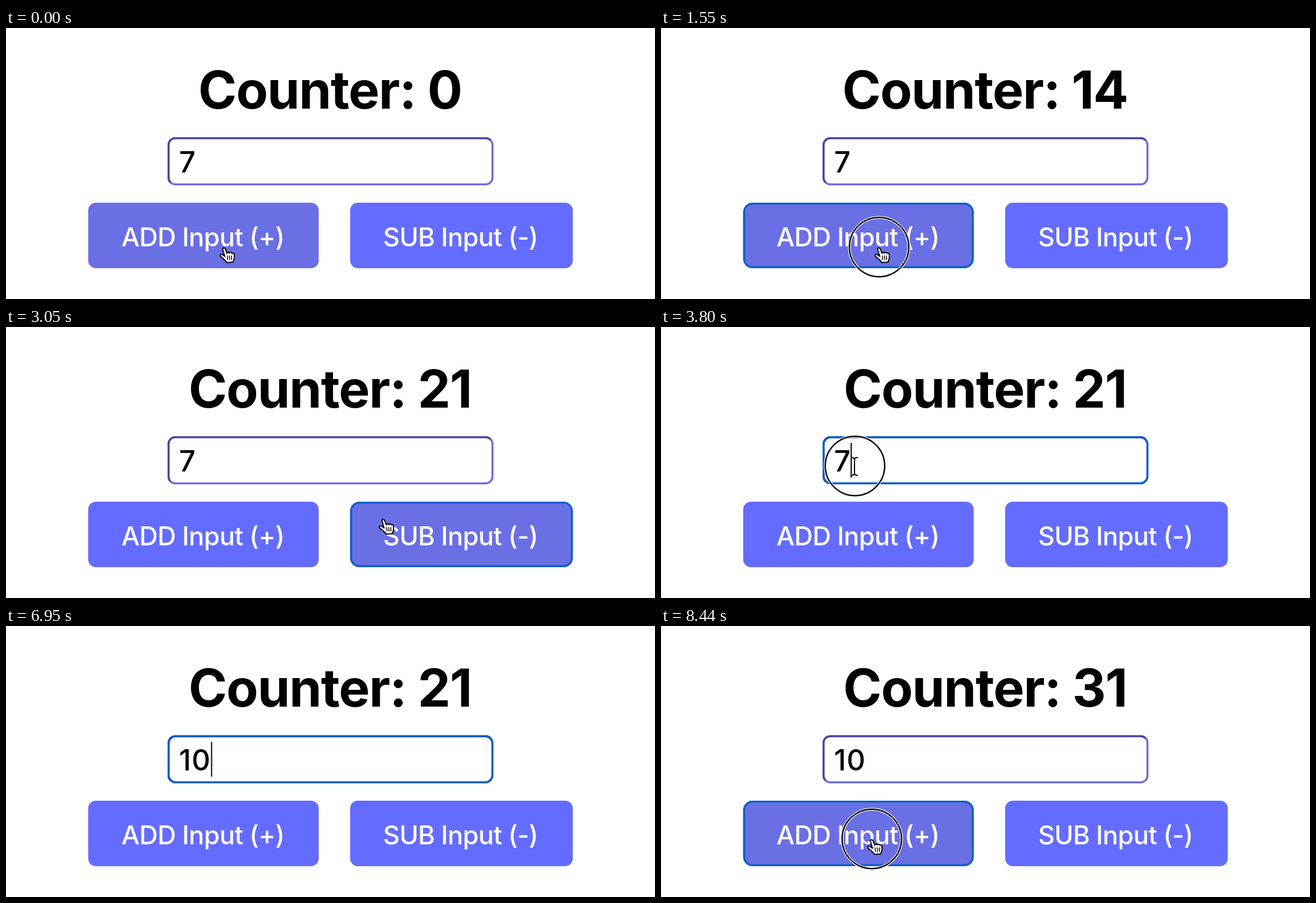
These frames come from a looping animation (1157x484 px, 8530 ms). An HTML page:

```html
<!DOCTYPE html>
<html lang="en">
<head>
<meta charset="utf-8">
<title>Counter</title>
<style>
  html, body { margin: 0; width: 100%; height: 100%; overflow: hidden; background: #fff; }
  svg { display: block; }
  text { font-family: Inter, "Liberation Sans", sans-serif; font-optical-sizing: none; font-feature-settings: "calt" 0; }
  #title { font-size: 93px; font-weight: 700; letter-spacing: -0.015em; text-anchor: middle; }
  .label { font-size: 46px; font-weight: 500; letter-spacing: -0.016em; text-anchor: middle; fill: #fff; }
  #value { font-size: 51.5px; font-weight: 500; letter-spacing: 0.02em; }
  .border { fill: none; stroke-width: 3.5; }
  .focus { stroke: #0a60c8; }
  .lit { stroke: #6c6ce0; }
  .dark { stroke: #48489f; }
</style>
</head>
<body>
<svg width="1157" height="484" viewBox="0 0 1157 484">
  <defs>
    <clipPath id="topLeft"><path d="M288 281V195H869L855 209L302 267Z"/></clipPath>
  </defs>
  <text id="title" x="577.7" y="144"></text>

  <rect class="border lit" x="289.75" y="196.75" width="577.5" height="82.5" rx="12"/>
  <rect class="border dark" x="289.75" y="196.75" width="577.5" height="82.5" rx="12" clip-path="url(#topLeft)"/>
  <rect class="border focus" id="inputFocus" x="289.75" y="196.75" width="577.5" height="82.5" rx="14"/>
  <rect id="selection" x="309" y="207" width="29" height="62" fill="#b3d7ff"/>
  <text id="value" x="308.5" y="258"></text>
  <rect id="caret" y="207" width="2" height="62"/>

  <rect id="add" x="146.5" y="312" width="411" height="117"/>
  <rect class="border focus" id="addFocus" x="148.25" y="313.75" width="407.5" height="113.5" rx="15"/>
  <text class="label" x="351" y="390">ADD Input (+)</text>
  <rect id="sub" x="613.5" y="312" width="397" height="117"/>
  <rect class="border focus" id="subFocus" x="615.25" y="313.75" width="393.5" height="113.5" rx="15"/>
  <text class="label" x="810.3" y="390">SUB Input (-)</text>

  <g id="pointer">
    <g id="ring" fill="none" transform="translate(.8 -.8)">
      <circle r="53" stroke="#fff" stroke-width="5"/>
      <circle r="53" stroke="#000" stroke-width="2.5"/>
    </g>
    <g id="hand" stroke="#000" stroke-linejoin="round" stroke-linecap="round">
      <path fill="#fff" stroke-width="2" d="M-1.5 4C-2.5 .5 1.5 -.5 3 2.5L6 10.5C6.5 8 9.5 8 10.5 10
        C11.5 8 14.5 8.5 15 10.5C17 9.5 19 10.5 19 13V18C19 21 17.5 22 17 26L5.5 27C4 23 -2 20 -5.5 16
        C-8 12.5 -4 11 -2 13L2 16Z"/>
      <path fill="none" stroke-width="1.5" d="M6.5 15L7.2 21.5M10.3 15L10.8 21.5M14 15L14.2 21.5"/>
    </g>
    <path id="arrow" stroke="#fff" stroke-width="3.5" stroke-linejoin="round" paint-order="stroke"
      d="M1 0V23L6 18.5L10 27.5L13.5 26L9.8 17.3H17Z"/>
    <path id="beam" fill="none" stroke="#000" stroke-width="2" d="M-6 -16Q0 -16 0 -12V12Q0 16 -6 16M6 -16Q0 -16 0 -12M0 12Q0 16 6 16"/>
  </g>
</svg>
<script>
const LOOP = 8530;
const $ = id => document.getElementById(id);
const show = (id, on) => { $(id).style.display = on ? "" : "none"; };
const clamp = v => Math.min(1, Math.max(0, v));
const latest = (list, t) => list.filter(item => item[0] <= t).pop();

// Press time, release time, time the ring disappears
const clicks = [[700, 850, 900], [1150, 1250, 1300], [1550, 1650, 1700], [1950, 2100, 2150],
  [2850, 2950, 3000], [3800, 4150, 4300], [7800, 7950, 8000], [8440, 8530, 8530]];
const counts = [[0, 0], [850, 7], [1250, 14], [1650, 21], [2100, 28], [2950, 21], [7950, 31]];
const focuses = [[0, ""], [700, "add"], [2850, "sub"], [3800, "input"], [7800, "add"]];
const values = [[0, "7"], [3800, "7"], [4900, ""], [4950, "0"], [6100, "1"], [6550, "10"], [6600, "10"]];
const caretX = { "": 308.5, "7": 338, "0": 341, "1": 332, "10": 365.5 };
// Start, end, from x, y, to x, y
const moves = [[2150, 2660, 388, 392, 672, 343], [3100, 3700, 671, 343, 345, 249],
  [3850, 4150, 345, 249, 259, 249], [7100, 7650, 259, 249, 375, 381]];

function pointerAt(t) {
  const [start, end, x0, y0, x1, y1] = latest(moves, t) || moves[0];
  const u = clamp((t - start) / (end - start));
  const s = u * u * (3 - 2 * u);
  return [x0 + (x1 - x0) * s, y0 + (y1 - y0) * s];
}

function hoverColor(amount) {
  const base = [100, 108, 255], hover = [107, 111, 228];
  return `rgb(${base.map((c, i) => c + (hover[i] - c) * amount)})`;
}

const fade = (t, start) => clamp((t - start) / 250);

function paintButton(name, hover, focused) {
  $(name).setAttribute("fill", hoverColor(hover));
  $(name).setAttribute("rx", focused ? 16.5 : 14);
}

function render(t) {
  const [x, y] = pointerAt(Math.floor(t / 50) * 50);
  const focus = latest(focuses, t)[1];
  const [typedAt, value] = latest(values, t);
  const selected = t >= 3950 && t < 4900;

  $("title").textContent = "Counter: " + latest(counts, t)[1];
  $("value").textContent = value;
  for (const name of ["input", "add", "sub"]) show(name + "Focus", focus === name);
  paintButton("add", t < 5000 ? 1 - fade(t, 2400) : fade(t, 7380), focus === "add");
  paintButton("sub", fade(t, 2510) - fade(t, 3300), focus === "sub");

  show("selection", selected);
  show("caret", focus === "input" && !selected && (t - typedAt) % 1000 < 500);
  $("caret").setAttribute("x", caretX[value]);

  const onButton = y > 312 && y < 429 && (x > 146 && x < 558 || x > 613 && x < 1011);
  const onInput = x > 288 && x < 869 && y > 195 && y < 281;
  show("pointer", t < 4900 || t >= 7100);
  $("pointer").setAttribute("transform", `translate(${x} ${y})`);
  show("hand", onButton);
  show("beam", onInput);
  show("arrow", !onButton && !onInput);

  // The ring shrinks on release before it disappears
  const click = clicks.find(([down, , gone]) => t >= down && t < gone);
  show("ring", click);
  if (click) for (const circle of $("ring").children) circle.setAttribute("r", t < click[1] ? 53 : 39);
}

function tick() {
  render(performance.now() % LOOP);
  requestAnimationFrame(tick);
}
tick();
</script>
</body>
</html>
```
